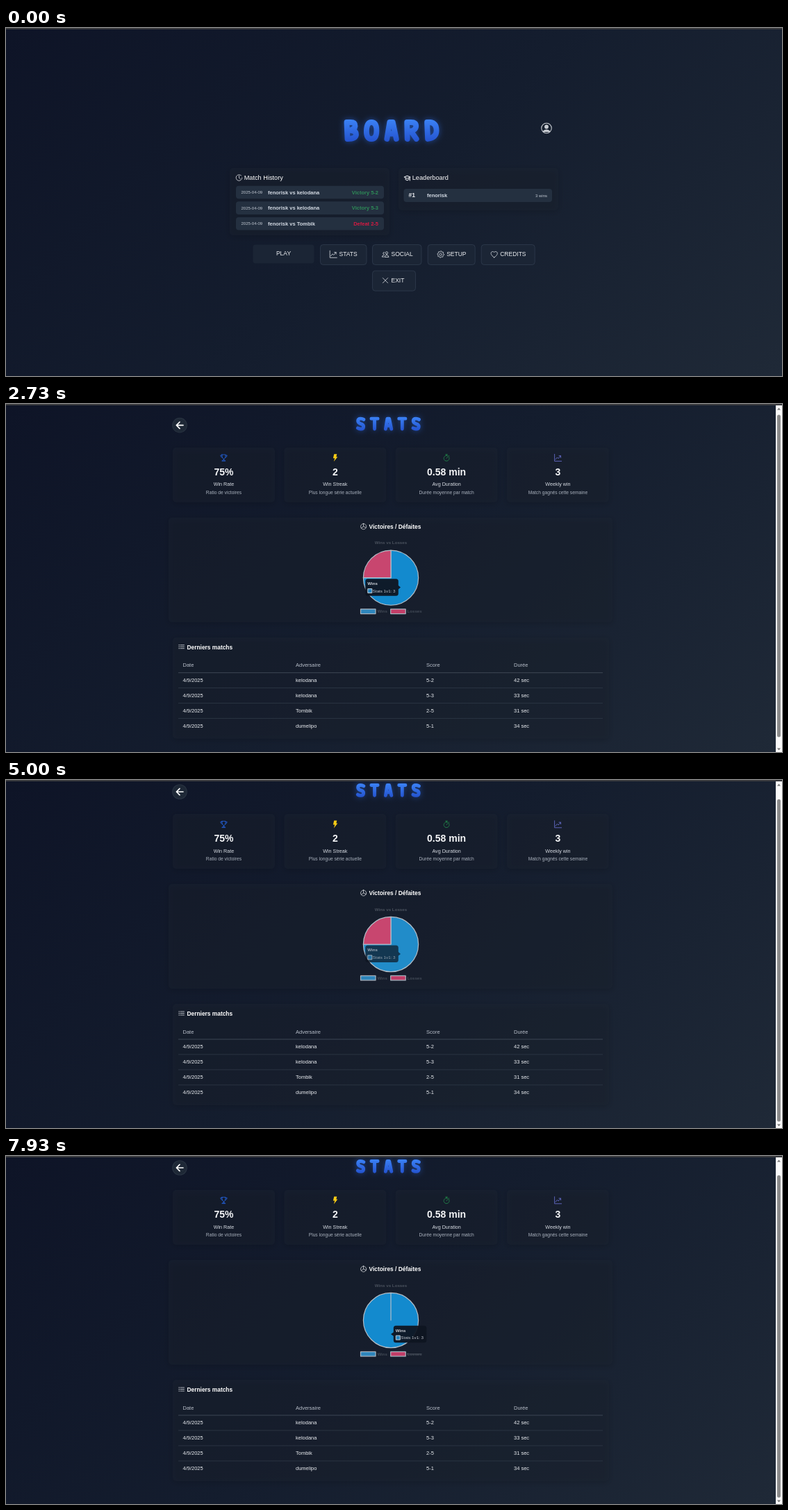
These frames come from a looping animation (1117 px wide and 502 px high, 8 s). An HTML page with a canvas:

```html
<!DOCTYPE html>
<html lang="fr">
<head>
<meta charset="utf-8">
<title>Board</title>
<style>
html, body { margin: 0; width: 100%; height: 100%; overflow: hidden; background: #111a2c; }
canvas { display: block; width: 1117px; height: 502px; }
</style>
</head>
<body>
<canvas id="stage" width="1117" height="502"></canvas>
<script>
const W = 1117, H = 502, LOOP = 8000, FPS = 15;
const ctx = document.getElementById('stage').getContext('2d');
const FONT = '"Liberation Sans", Arial, sans-serif';
const TAU = Math.PI * 2;
const ICON = '#cfd4da';

const clamp = v => Math.max(0, Math.min(1, v));
const ramp = (t, start, length) => clamp((t - start) / length);
const outQuart = u => 1 - (1 - u) ** 4;
const inOut = u => u < .5 ? 2 * u * u : 1 - 2 * (1 - u) ** 2;
const pulse = (t, on, off, rise = 400, fall = 400) =>
  outQuart(ramp(t, on, rise)) * (1 - outQuart(ramp(t, off, fall)));

// Letter centre lines in a 22 x 32 box
const GLYPHS = {
  B: 'M4.5 4L5.5 28M4.5 4H10Q16.5 4 16.5 9.5Q16 14.5 8 15.5Q18 15.5 18 22Q17 28 5.5 28',
  O: 'M11 4Q18.5 4 18.5 16T11 28T4 16T11 4Z',
  A: 'M4.5 28L8.5 4H13L18 28M7 20.5H15',
  R: 'M5 28L4.5 4H10Q17.5 4 17.5 10Q17 16 7 17.5M10 16.5L18 28',
  D: 'M5.5 28L4.5 4H9Q18 5 18 16Q18 26 5.5 28Z',
  S: 'M18 6Q15 4 11 4Q4.5 4 4.5 9.5Q5 14 11 16Q18 18 17.5 23Q17 28 11 28Q7 28 4 26',
  T: 'M3.5 4H18.5M11 4V28'
};

// Line icons on a 16 x 16 grid
const ICONS = {
  clock: 'M15.3 8A7.3 7.3 0 1 1 13.2 2.8M8 3.5V8.5L11 10.5',
  cap: 'M.8 5.5L8 2.5L15.5 5.5L8 9ZM4 8V11.5L8 13.5L12 11.5V8M14.5 6V14',
  graph: 'M.7 0V15.3H16M2.8 11.5L6.5 7L9 9.5L14 3.5M10.5 3.5H14.3V7.5',
  people: 'M11 7.5A2.6 2.6 0 1 0 11 2.3A2.6 2.6 0 0 0 11 7.5ZM6.5 13.5Q7 9.5 11 9.5T15.5 13.5ZM5.5 8A2.2 2.2 0 1 1 6 3.7M4.5 13.5H.7Q1 10 5 9.8',
  heart: 'M8 14.8C-4 7.5 1.5-1.2 8 3.2C14.5-1.2 20 7.5 8 14.8Z',
  cross: 'M2.5 2.5L13.5 13.5M13.5 2.5L2.5 13.5',
  trophy: 'M4 1H12Q12 10 8 10.5Q4 10 4 1ZM4 2.5H.8Q1 7 5 7.5M12 2.5H15.2Q15 7 11 7.5M8 10.5V13M4.5 15H11.5L10 13H6Z',
  timer: 'M8 3A6 6 0 1 1 7.99 3ZM6 .7H10M8 .7V3M8 9L10.5 6M13 3L14 4',
  pie: 'M8 .8A7.2 7.2 0 1 1 7.99 .8ZM8 1V8L14 11M8 8L2 12.5',
  list: 'M5 3H16M5 8H16M5 13H16M.5 3H2.5M.5 8H2.5M.5 13H2.5',
  arrow: 'M15 8H1.5M8 1.5L1.5 8L8 14.5'
};
const bolt = new Path2D('M5.5 0H11.5L10 6H13L5 16L7 9H3.5Z');
const GEAR = Array.from({ length: 33 }, (_, i) => {
  const r = i % 4 < 2 ? 7.3 : 5.8, a = i / 32 * TAU;
  return (i ? 'L' : 'M') + (8 + r * Math.cos(a)) + ' ' + (8 + r * Math.sin(a));
}).join('') + 'M10.7 8A2.7 2.7 0 1 1 10.69 7.9';
ICONS.gear = GEAR;

function text(str, x, y, size, color, { bold = false, align = 'left' } = {}) {
  ctx.font = `${bold ? 'bold ' : ''}${size}px ${FONT}`;
  ctx.textAlign = align;
  ctx.fillStyle = color;
  ctx.fillText(str, x, y + size * .35);
}

function box(x, y, w, h, r, fill, stroke, line = 1) {
  ctx.beginPath();
  ctx.roundRect(x, y, w, h, r);
  ctx.fillStyle = fill;
  ctx.fill();
  if (stroke) {
    ctx.strokeStyle = stroke;
    ctx.lineWidth = line;
    ctx.stroke();
  }
}

function rule(x1, x2, y, color, width = 1) {
  ctx.fillStyle = color;
  ctx.fillRect(x1, y - width / 2, x2 - x1, width);
}

function disc(x, y, r, fill) {
  ctx.beginPath();
  ctx.arc(x, y, r, 0, TAU);
  ctx.fillStyle = fill;
  ctx.fill();
}

function at(x, y, scale, draw) {
  ctx.save();
  ctx.translate(x, y);
  ctx.scale(scale, scale);
  draw();
  ctx.restore();
}

function icon(name, cx, cy, size, color = ICON, line = 1.3) {
  at(cx - size / 2, cy - size / 2, size / 16, () => {
    ctx.strokeStyle = color;
    ctx.lineWidth = line;
    ctx.lineJoin = ctx.lineCap = 'round';
    ctx.stroke(new Path2D(ICONS[name]));
  });
}

function panel(x, y, w, h) {
  ctx.save();
  ctx.shadowColor = 'rgba(0,0,0,.45)';
  ctx.shadowBlur = 8;
  ctx.shadowOffsetY = 2;
  box(x, y, w, h, 5, 'rgba(31,41,55,.36)');
  ctx.restore();
}

function title(word, x, y, scale, step) {
  [...word].forEach((letter, i) => at(x + i * step, y, scale, () => {
    const fill = ctx.createLinearGradient(0, 0, 0, 32);
    fill.addColorStop(0, '#3b82f6');
    fill.addColorStop(1, '#2453cf');
    ctx.strokeStyle = fill;
    ctx.lineWidth = 7.8;
    ctx.lineCap = 'butt';
    ctx.lineJoin = 'round';
    ctx.lineCap = 'round';
    ctx.shadowColor = 'rgba(45,105,225,.55)';
    ctx.shadowBlur = 9;
    ctx.stroke(new Path2D(GLYPHS[letter]));
  }));
}

function background() {
  const d = (W + H) / 4;
  const g = ctx.createLinearGradient(W / 2 - d, H / 2 - d, W / 2 + d, H / 2 + d);
  g.addColorStop(0, '#0e1427');
  g.addColorStop(.5, '#141d2e');
  g.addColorStop(1, '#1f2937');
  ctx.fillStyle = g;
  ctx.fillRect(0, 0, W, H);
}

function button(label, name, x, y, w, hover = 0) {
  const h = name ? 30 : 28, cx = x + w / 2, cy = y + h / 2;
  at(cx, cy, 1 + .03 * hover, () => {
    ctx.translate(-cx, -cy);
    const edge = name && `rgba(${70 + 30 * hover},${85 + 30 * hover},${105 + 30 * hover},.4)`;
    box(x + .5, y + .5, w - 1, h - 1, 4, '#1b2535', edge);
    if (name) {
      icon(name, x + 19, cy - .5, 10.5);
      text(label, x + 27.5, cy - .5, 8.5, '#eceef1');
    } else {
      text(label, cx, cy - .5, 8.5, '#eceef1', { align: 'center' });
    }
  });
}

function homePage(t) {
  title('BOARD', 486, 132, 1, 28.9);

  disc(778, 144.5, 7.8, '#c9cdd3');
  disc(778, 144.5, 6.7, '#16202f');
  disc(778, 142.5, 2.9, '#c9cdd3');
  ctx.beginPath();
  ctx.ellipse(778, 150, 5.2, 3.4, 0, Math.PI, TAU);
  ctx.fill();

  panel(322, 202, 230, 97);
  icon('clock', 335.5, 216, 9.5, '#e5e7eb');
  text('Match History', 342.7, 216, 9.2, '#fff');
  [['kelodana', 'Victory 5-2'], ['kelodana', 'Victory 5-3'], ['Tombik', 'Defeat 2-5']].forEach(([rival, result], i) => {
    const y = 237 + i * 22.6;
    box(331, y - 9.3, 213, 18.6, 4, '#243040');
    text('2025-04-09', 338.5, y, 6, '#c3cad4');
    text('fenorisk vs ' + rival, 377, y, 7.5, '#d3dae3', { bold: true });
    text(result, 536, y, 7.5, result[0] === 'V' ? '#2e8b57' : '#d51a42', { bold: true, align: 'right' });
  });

  panel(565, 202, 230, 61);
  icon('cap', 577.5, 216.5, 9.5, '#e5e7eb', 1.7);
  text('Leaderboard', 584.7, 216, 9.2, '#fff');
  box(572.5, 232, 213.5, 19, 4, '#243040');
  text('#1', 579.5, 241.5, 8.5, '#e5e7eb', { bold: true });
  text('fenorisk', 606, 241.5, 7.5, '#d3dae3', { bold: true });
  text('3 wins', 779, 241.5, 6, '#c3cad4', { align: 'right' });

  button('PLAY', null, 355, 312, 89, pulse(t, 620, 930, 250, 250));
  button('STATS', 'graph', 452, 312, 67.5, outQuart(ramp(t, 1000, 300)));
  button('SOCIAL', 'people', 527, 312, 71.5);
  button('SETUP', 'gear', 606.7, 312, 69);
  button('CREDITS', 'heart', 683.7, 312, 78);
  button('EXIT', 'cross', 527, 349.7, 63);
}

const CARDS = [
  ['trophy', '#2460d8', '75%', 'Win Rate', 'Ratio de victoires'],
  ['bolt', '#facc15', '2', 'Win Streak', 'Plus longue série actuelle'],
  ['timer', '#23884a', '0.58 min', 'Avg Duration', 'Durée moyenne par match'],
  ['graph', '#686fcf', '3', 'Weekly win', 'Match gagnés cette semaine']
];

function cards() {
  CARDS.forEach(([name, color, value, label, note], i) => {
    const x = 240 + i * 160.3, cx = x + 73.5;
    panel(x, 66, 147, 79);
    if (name === 'bolt') {
      at(cx - 5.3, 75.5, .68, () => { ctx.fillStyle = color; ctx.fill(bolt); });
    } else {
      icon(name, cx, 81, 10.5, color);
    }
    const center = { align: 'center' };
    text(value, cx, 101.2, 14, '#f5f6f8', { bold: true, align: 'center' });
    text(label, cx, 119, 7.2, '#d8dde4', center);
    text(note, cx, 131, 6.7, '#a9b1bd', center);
  });
}

const PIE = { x: 554, y: 254, r: 40 };

function slice(from, to, fill) {
  if (to - from < .001) return;
  ctx.beginPath();
  ctx.moveTo(PIE.x, PIE.y);
  ctx.arc(PIE.x, PIE.y, PIE.r - .4, from - TAU / 4, to - TAU / 4);
  ctx.closePath();
  ctx.fillStyle = fill;
  ctx.fill();
  ctx.strokeStyle = '#b3bec8';
  ctx.lineWidth = 1.2;
  ctx.lineJoin = 'round';
  ctx.stroke();
}

function tooltip(x, y, tipX, alpha) {
  if (alpha <= 0) return;
  const edge = tipX < x ? x : x + 47.5;
  ctx.save();
  ctx.globalAlpha = alpha;
  const shape = new Path2D();
  shape.roundRect(x, y, 47.5, 24.5, 3.5);
  shape.moveTo(edge, y + 9.5);
  shape.lineTo(tipX, y + 12.3);
  shape.lineTo(edge, y + 15);
  ctx.fillStyle = 'rgba(14,21,32,.94)';
  ctx.fill(shape);
  text('Wins', x + 3, y + 6.7, 6.2, '#c9ced5', { bold: true });
  box(x + 3.5, y + 14.3, 6, 6, 0, '#2585c2', '#c4ccd4');
  text('Stats 1v1: 3', x + 10.5, y + 17.2, 6.2, '#c0c6ce');
  ctx.restore();
}

function chart(t) {
  const drawn = outQuart(ramp(t, 1466, 1000));
  const hidden = outQuart(ramp(t, 5800, 1000));
  const sideHover = [[2400, 3000], [4530, 4950]];
  const hover = Math.max(...sideHover.map(([on, off]) => pulse(t, on, off)), pulse(t, 7140, LOOP));
  const mix = (a, b) => Math.round(a + (b - a) * hover);

  panel(234, 167, 639, 151);
  icon('pie', 514.6, 180, 9, '#e5e7eb');
  text('Victoires / Défaites', 522.5, 180, 8.4, '#fff', { bold: true });
  text('Wins vs Losses', PIE.x, 203.5, 6.2, '#4a515d', { bold: true, align: 'center' });

  const winEnd = TAU * drawn * (.75 + .25 * hidden);
  slice(0, winEnd, `rgb(${mix(53, 19)},${mix(143, 138)},${mix(195, 206)})`);
  slice(winEnd, TAU * drawn, '#c8466f');

  [['Wins', 510, '#2f86bc'], ['Losses', 553.2, '#c23e68']].forEach(([label, x, color]) => {
    box(x + .5, 299.3, 21.5, 6.6, 0, color, '#aab6c1', 1.2);
    text(label, x + 24.4, 302.6, 6.1, '#414955', { bold: true });
  });
  if (t >= 5860) rule(577, 598.5, 302.7, '#4a515d', 1);

  const shown = Math.max(...sideHover.map(([on, off]) => ramp(t, on, 200) * (1 - ramp(t, off, 200))));
  tooltip(517.3, 255.6, 568, shown);
  tooltip(557.8, 261.8, 554, ramp(t, 7140, 200));
}

function table() {
  const columns = [254.5, 417, 605, 731];
  const row = (cells, y, color) => cells.forEach((cell, i) => text(cell, columns[i], y, 7.5, color));
  panel(240, 340, 628, 146);
  icon('list', 252.5, 353.5, 8, '#d5d9df', 1.6);
  text('Derniers matchs', 260.5, 354, 8.4, '#fff', { bold: true });
  row(['Date', 'Adversaire', 'Score', 'Durée'], 380, '#b8bfca');
  rule(248, 859, 391, '#3d4754');
  [['kelodana', '5-2', 42], ['kelodana', '5-3', 33], ['Tombik', '2-5', 31], ['dumelipo', '5-1', 34]].forEach(([rival, score, secs], i) => {
    const y = 401.6 + i * 22;
    row(['4/9/2025', rival, score, secs + ' sec'], y, '#e9ecf0');
    if (i < 3) rule(248, 859, y + 11.3, '#2a3441');
  });
}

function scrollbar(scroll) {
  ctx.fillStyle = '#fafafa';
  ctx.fillRect(1108, 0, 9, H);
  box(1110, 12.5 + scroll * .9, 5, 465, 2.5, '#8b8b8b');
  [[8.5, -3], [496.5, 3]].forEach(([y, d]) => {
    ctx.beginPath();
    ctx.moveTo(1110, y);
    ctx.lineTo(1115, y);
    ctx.lineTo(1112.5, y + d);
    ctx.fillStyle = '#777';
    ctx.fill();
  });
}

function statsPage(t) {
  const scroll = 17 * inOut(ramp(t, 2655, 250));
  ctx.save();
  ctx.translate(0, -scroll);
  title('STATS', 503.8, 22, .62, 19.9);
  disc(250, 34, 10.8, '#2b3644');
  disc(250, 34, 10, '#1e2836');
  icon('arrow', 250, 34, 11.5, '#fff', 2.3);
  cards();
  chart(t);
  table();
  ctx.restore();
  scrollbar(scroll);
}

function render(now) {
  const step = Math.floor((now % LOOP + 4) * FPS / 1000) % (LOOP * FPS / 1000);
  const t = step * 1000 / FPS;
  background();
  if (t < 1460) homePage(t);
  else statsPage(t);
  ctx.fillStyle = '#3a3b3f';
  ctx.fillRect(0, 0, W, 2);
}

let start;
function tick(now) {
  start ??= now;
  render(now - start);
  requestAnimationFrame(tick);
}
render(0);
requestAnimationFrame(tick);
</script>
</body>
</html>
```
